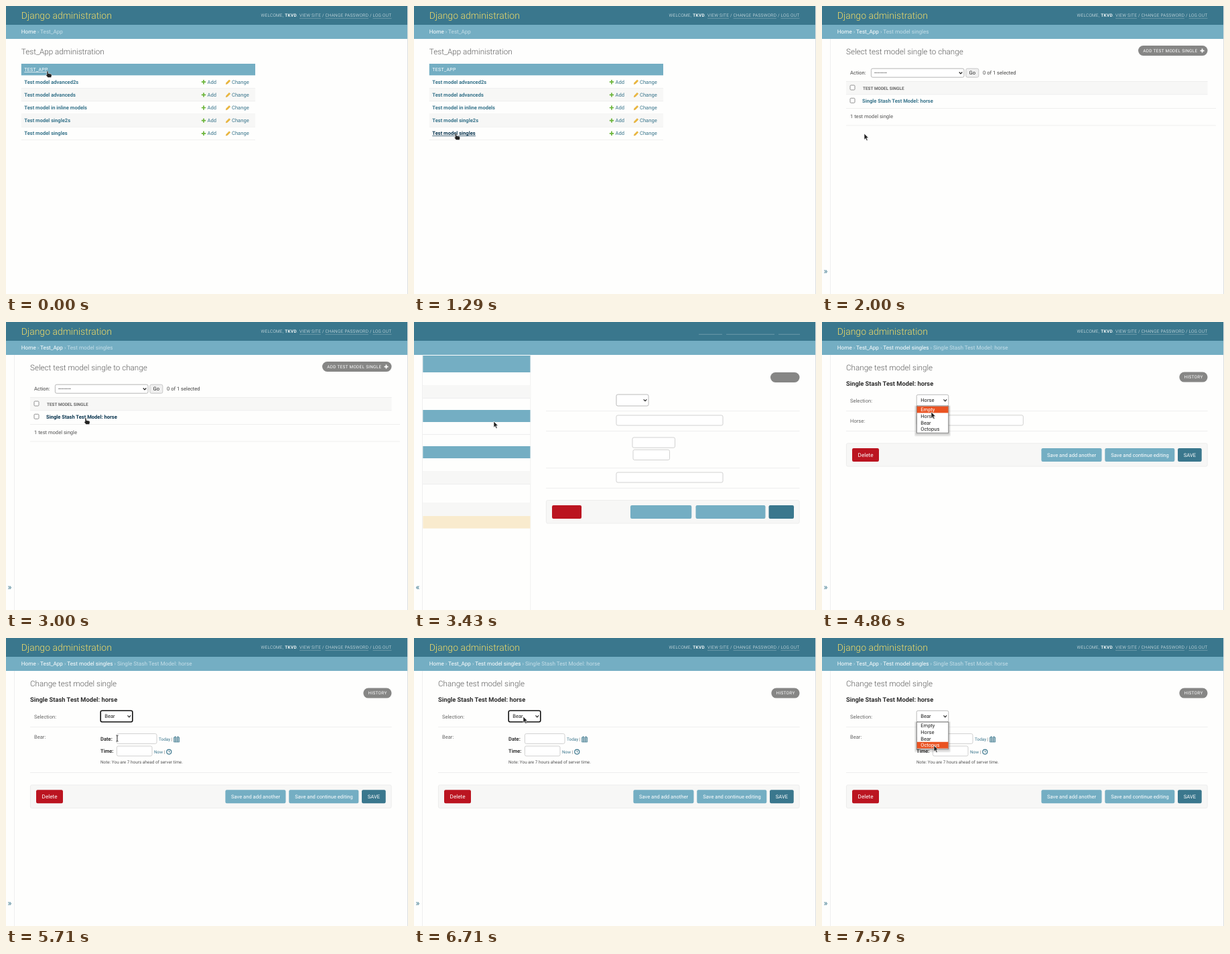
These frames come from a looping animation (600x429 px, 8000 ms). An HTML page:

```html
<!DOCTYPE html>
<html lang="en">
<head>
<meta charset="utf-8">
<title>Admin walkthrough</title>
<style>
html, body { margin: 0; width: 100%; height: 100%; overflow: hidden; background: #fefefd; }
svg { display: block; width: 100vw; height: 100vh; }
text { font-family: Roboto, sans-serif; white-space: pre; text-rendering: geometricPrecision; }
</style>
</head>
<body>
<svg id="stage" viewBox="0 0 600 429"></svg>
<script>
const LOOP = 8000, FPS = 7;
const DARK = '#3a778d', BLUE = '#74aec3', PALE = '#c5dee8', LINK = '#39758c', HOVER = '#08344f';
const LINE = '#e9e9e9', BAND = '#f7f7f6', GREY = '#868685', RED = '#bb1420', ORANGE = '#ea5322';
const BODY = 7.58, SMALL = 6.42, BOLD = 'font-weight="700"', LIGHT = 'font-weight="300"', SPACED = 'letter-spacing=".29"';

// y is the middle of the capitals
const text = (x, y, s, fill = '#444', size = BODY, more = '') =>
  `<text x="${x}" y="${y + size * .355}" font-size="${size}" fill="${fill}" ${more}>${s}</text>`;
const box = (x, y, x2, y2, fill, more = '') =>
  `<rect x="${x}" y="${y}" width="${x2 - x}" height="${y2 - y}" fill="${fill}" ${more}/>`;
const path = (d, stroke, width = 1, fill = 'none') =>
  `<path d="${d}" fill="${fill}" stroke="${stroke}" stroke-width="${width}"/>`;
const rule = (x, y, x2, color = LINE) => box(x, y, x2, y + .7, color);
const field = (x, y, x2, y2, fill = '#fff', stroke = '#c6c6c6', width = .8) =>
  box(x, y, x2, y2, fill, `rx="2.2" stroke="${stroke}" stroke-width="${width}"`);
const pill = (x, y, s = '') =>
  box(x, y, 575.5, y + 15, GREY, 'rx="7.5"') + text(x + 7.3, y + 7.4, s, '#fff', SMALL, SPACED);
const button = (x, y, x2, fill, s = '', tx = 0, size = BODY) =>
  box(x, y, x2, y + 20, fill, 'rx="2.2"') + text(tx, y + 10, s, '#fff', size);
const plus = (x, y, r, color) => path(`M${x - r} ${y}h${2 * r}M${x} ${y - r}v${2 * r}`, color, 1.7);
const checkbox = (x, y) => box(x, y, x + 7, y + 7, '#fff', 'rx="1.4" stroke="#767676" stroke-width=".8"');
const chevron = (x, y) => path(`M${x - 2.3} ${y - 1.2}l2.3 2.4l2.3 -2.4`, '#222', 1.2);
const select = (x, y, x2, y2, s = '', focus = false) =>
  field(x, y, x2, y2, '#fff', focus ? '#111' : '#b3b3b3', focus ? 1.6 : .9) +
  text(x + 6, (y + y2) / 2, s, '#222') + chevron(x2 - 5, (y + y2) / 2);

function header(trail) {
  const bars = trail ? [[438, 470], [476.5, 541], [547.5, 575.5]] : [[425, 460], [466, 538], [544, 576]];
  let s = box(0, 0, 600, 28, DARK) + box(0, 28, 600, 49, BLUE) +
    bars.map(b => rule(b[0], 17.9, b[1], '#7ea6b4')).join('');
  if (!trail) return s;
  const tool = (x, w, more = LIGHT) => text(x, 14, w, '#f2f8f8', SMALL, SPACED + ' ' + more);
  s += text(22.8, 14, 'Django administration', '#f1dc68', 14, LIGHT) +
    tool(380.5, 'WELCOME,') + tool(416.3, 'TKVD', BOLD) + tool(434, '.') + tool(438, 'VIEW SITE') +
    tool(472, '/') + tool(476.5, 'CHANGE PASSWORD') + tool(543, '/') + tool(547.5, 'LOG OUT');
  const crumbs = trail.map((w, i) =>
    i < trail.length - 1 ? `<tspan fill="#fff">${w}</tspan> › ` : w).join('');
  return s + text(22.8, 38.5, crumbs, PALE, 8.17);
}

const toggle = mark => box(12.3, 49, 13, 429, LINE) + text(2.6, 394.5, mark, LINK, 12.6);
const heading = (x, s) => text(x, 67.6, s, '#5c5c5c', 11.66, LIGHT);

const MODELS = [['advanced2s', 108], ['advanceds', 104], ['in inline models', 121], ['single2s', 97], ['singles', 92]];
const rowY = i => 113 + i * 19.15;

function indexPage(hover, focused) {
  let s = header(['Home', 'Test_App']) + heading(22.8, 'Test_App administration') +
    box(22.8, 86, 372, 103.3, BLUE) + text(27.3, 95, 'TEST_APP', '#fff', 7, SPACED);
  if (hover === 'app') s += rule(27.3, 98.2, 63, '#fff');
  MODELS.forEach(([name, end], i) => {
    const y = rowY(i);
    if (i % 2) s += box(22.8, y - 9.4, 372, y + 9.4, BAND);
    s += rule(22.8, y + 9.3, 372) +
      text(27.3, y, 'Test model ' + name, hover === i ? HOVER : LINK, BODY, BOLD) +
      plus(295, y + .2, 3.2, '#6bb53a') + text(300.5, y, 'Add', LINK) +
      path(`M328.3 ${y + 3.5}l.6 -2.2l4.2 -4.2l1.6 1.6l-4.2 4.2z`, '#d59a20', .5, '#edb93a') +
      text(337, y, 'Change', LINK);
    if (hover === i && focused) s += rule(27.3, y + 3.7, end, HOVER);
  });
  return s;
}

// Sidebar bands: top, bottom, colour
const BANDS = [[50, 75, BLUE], [94, 113, BAND], [131, 149, BLUE], [185, 203, BLUE],
  [222, 241, BAND], [269, 289, BAND], [289, 307.5, '#f9ebce']];
const sidebar = () => toggle('«') + box(173.5, 49, 174.2, 429, LINE) +
  [94, 113, 167.3, 222, 241, 269].map(y => rule(13, y, 173.5)).join('') +
  BANDS.map(b => box(13.3, b[0], 173.5, b[1], b[2])).join('');

const listBands = x => box(x, 112.3, 575.5, 131.7, BAND) + rule(x, 112, 575.5) + rule(x, 131.5, 575.5) +
  rule(x, 152, 588) + rule(x, 177.6, 588) + checkbox(x + 6, 118) + checkbox(x + 6, 137.3);

const listLoading = () => header() + sidebar() + pill(500, 59) + listBands(197) +
  select(234, 93, 373, 106) + field(376, 93, 395, 106, '#efefef');

function listPage(hover, focused) {
  const color = hover ? HOVER : LINK;
  return header(['Home', 'Test_App', 'Test model singles']) + toggle('»') +
    heading(36, 'Select test model single to change') +
    pill(472, 59, 'ADD TEST MODEL SINGLE') + plus(567.5, 66.6, 3, '#fff') +
    text(42, 99.6, 'Action:') + field(73.4, 93.2, 212, 106.2, '#fff', '#a5a5a5') +
    text(78, 99.6, '---------', '#222') + chevron(207, 99.7) +
    field(214.8, 93.2, 233.8, 106.2, '#f0f0f0', '#bdbdbd') + text(219.5, 99.8, 'Go', '#222') +
    text(240, 99.6, '0 of 1 selected') + listBands(36) +
    text(61, 122.5, 'TEST MODEL SINGLE', '#666', SMALL, BOLD) +
    text(60, 141.3, 'Single Stash Test Model: horse', color, BODY, BOLD) +
    (hover && focused ? rule(60, 145, 166, HOVER) : '') +
    text(42, 164.8, '1 test model single', '#555');
}

const submitRow = (x, y) => field(x + .4, y, 575.2, y + 34.4, BAND, '#e8e8e8', .7);

const formLoading = () => header() + sidebar() + pill(532, 75) + select(302, 108, 350, 125) +
  [132.4, 162, 217.3, 247].map(y => rule(197, y, 575.5)).join('') +
  field(302, 139, 461, 154) + field(326, 172, 389.5, 187.3) + field(327, 190.3, 381.5, 205.5) +
  field(302, 224, 461, 239) + submitRow(197, 265.6) + button(206, 273, 250, RED) +
  button(323, 273, 414.3, BLUE) + button(420.5, 273, 524.5, BLUE) + button(529.5, 273, 567, DARK);

function bearFields() {
  const cal = path('M250.6 148h8v7h-8zM250.6 149.2h8M250.6 151.3h8M250.6 153.3h8M253.2 149v6M256 149v6', LINK, .8) +
    path('M252.5 146.3v2M256.7 146.3v2', LINK, 1.1);
  const clock = `<circle cx="243.3" cy="169.6" r="3.5" fill="none" stroke="${LINK}" stroke-width="1.2"/>` +
    path('M243.3 167.5v2.3h1.6', LINK, .9);
  return text(141, 150.6, 'Date:', '#333', BODY, BOLD) + field(165.4, 142.6, 225, 157.4) +
    text(228, 151.2, `Today <tspan fill="#666">|</tspan>`, LINK, SMALL) + cal +
    text(141, 168.8, 'Time:', '#333', BODY, BOLD) + field(165.4, 161, 218, 175.8) +
    text(221, 169.4, `Now <tspan fill="#666">|</tspan>`, LINK, SMALL) + clock +
    text(141, 184.4, 'Note: You are 7 hours ahead of server time.', '#555', SMALL);
}

function formPage(choice, focus) {
  const bear = choice === 'Bear', drop = bear ? 38.2 : 0, y = 188 + drop;
  return header(['Home', 'Test_App', 'Test model singles', 'Single Stash Test Model: horse']) + toggle('»') +
    heading(36, 'Change test model single') + pill(533.3, 74.6, 'HISTORY') +
    text(36, 91.7, 'Single Stash Test Model: horse', '#2d2d2d', 9.33, BOLD) +
    text(42, 117, 'Selection:', '#666') + select(141.2, 108.3, 188.8, 125, choice, focus) +
    rule(36, 132.4, 575.5) + text(42, 147.6, choice + ':', '#666') +
    (bear ? bearFields() : field(141.2, 138.8, 300.3, 154)) +
    rule(36, 162 + drop, 575.5) + submitRow(36, 180.7 + drop) +
    button(45, y, 85, RED, 'Delete', 53.6, 8.17) +
    button(327.4, y, 417.5, BLUE, 'Save and add another', 336) +
    button(422.3, y, 526.3, BLUE, 'Save and continue editing', 431.2) +
    button(531, y, 566.7, DARK, 'SAVE', 539.8);
}

const OPTIONS = ['Empty', 'Horse', 'Bear', 'Octopus'], STEP = 9.7;
function popup(active) {
  let s = [3, 2, 1].map(g => box(141 - g, 125.5 - g / 2, 189 + g, 165.5 + g * 1.7, '#000', 'opacity=".07" rx="2"')).join('') +
    box(141.4, 125.2, 188.8, 165.2, '#fff', 'stroke="#777" stroke-width=".8"');
  OPTIONS.forEach((name, i) => {
    const y = 125.7 + i * STEP;
    if (i === active) s += box(141.7, y, 188.5, y + STEP, ORANGE);
    s += text(147.2, y + 4.8, name, i === active ? '#fff' : '#222');
  });
  return s;
}

const POINTERS = {
  arrow: path('M0 0V9.2L2.1 7.2L3.6 10.6L5.2 9.9L3.7 6.6H6.5Z', '#fff', .6, '#222'),
  hand: path('M-1 .6Q0 -.9 1 .6V3.4L5 4.3Q6.4 4.7 6.2 6.4L5.4 9.6H.4L-2.2 6.3Q-2 4.8 -1 5.5Z', '#fff', .5, '#222'),
  beam: path('M-1.6 -4Q0 -4 0 -3V4Q0 5 -1.6 5M1.6 -4Q0 -4 0 -3M0 4Q0 5 1.6 5', '#222', .9)
};

// Pointer route: tick, x, y
const ROUTE = [[0, 62, 97], [1, 62, 97], [2, 62, 111], [3, 62, 129], [4, 62, 160], [5, 62, 181], [6, 62, 190],
  [12, 63, 190], [14, 63, 190], [20, 112, 149], [21, 119, 143], [23, 119, 143], [24, 119, 148], [27, 132, 170],
  [30, 160, 117], [32, 162, 120], [34, 163, 134], [35, 163, 139], [37, 163, 151], [39, 163, 151],
  [40, 166, 149], [42, 172, 152], [44, 180, 135], [46, 164, 119], [47, 163, 117], [49, 163, 119],
  [50, 164, 128], [53, 167, 160], [56, 167, 160]];

function pointerAt(n) {
  const k = ROUTE.findIndex(p => p[0] >= n);
  if (k < 1) return ROUTE[0].slice(1);
  const [n0, x0, y0] = ROUTE[k - 1], [n1, x1, y1] = ROUTE[k], f = (n - n0) / (n1 - n0);
  return [x0 + (x1 - x0) * f, y0 + (y1 - y0) * f];
}

function scene(n) {
  const [x, y] = pointerAt(n);
  let page, kind = 'arrow';
  if (n < 12) {
    const row = MODELS.findIndex((m, i) => Math.abs(y - rowY(i)) < 5.5 && x < m[1]);
    const hover = Math.abs(y - 95) < 4 ? 'app' : row;
    if (hover !== -1) kind = 'hand';
    page = indexPage(hover, n >= 9);
  } else if (n === 12) page = listLoading();
  else if (n < 24) {
    const hover = Math.abs(y - 141.3) < 5.5;
    if (hover) kind = 'hand';
    page = listPage(hover, n >= 22);
  } else if (n === 24) page = formLoading();
  else {
    const bear = n >= 40, open = (n >= 32 && n < 40) || n >= 49;
    page = formPage(bear ? 'Bear' : 'Horse', bear && !open);
    if (open) page += popup(y > 125.7 ? Math.floor((y - 125.7) / STEP) : bear ? 2 : 1);
    else if (bear && x > 165 && x < 225 && y > 142 && y < 158) kind = 'beam';
  }
  return page + box(599, 0, 600, 429, '#dcdfe0') +
    `<g transform="translate(${x} ${y})">${POINTERS[kind]}</g>`;
}

const stage = document.getElementById('stage');
let shown = -1;
function draw(now) {
  const n = Math.floor(((now % LOOP) + 5) * FPS / 1000) % (LOOP * FPS / 1000);
  if (n !== shown) stage.innerHTML = scene(shown = n);
  requestAnimationFrame(draw);
}
draw(0);
</script>
</body>
</html>
```
